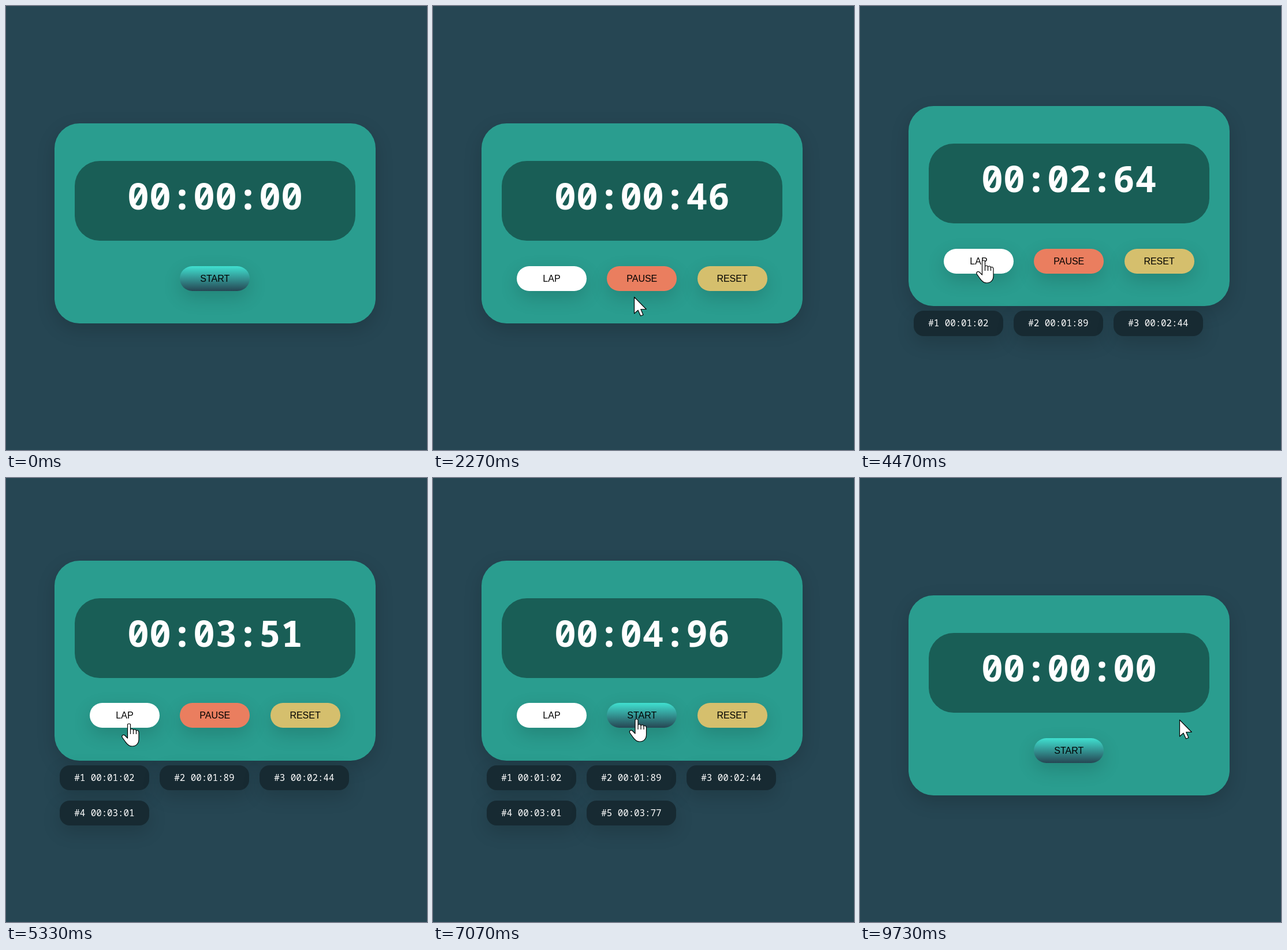
Animation, 729 px wide and 768 px high, one loop 9860 ms. Source, as an HTML page:

```html
<!DOCTYPE html>
<html lang="en">
<head>
<meta charset="utf-8">
<title>Stopwatch</title>
<style>
  html { font-size: 17.28px; }
  html, body { margin: 0; width: 100%; height: 100%; overflow: hidden; background: #264653; }
  div { position: absolute; box-sizing: border-box; text-align: center; white-space: pre; }
  #card, .button, .lap { box-shadow: 0 11px 32px rgba(0, 0, 0, .16); }
  #card { left: 84px; width: 556px; height: 20rem; border-radius: 2.5rem; background: #2a9d8f; }
  #display {
    left: 2rem; right: 2rem; top: 3.75rem; height: 8rem; border-radius: 2.5rem;
    background: rgba(0, 0, 0, .4); color: #fff;
    font: bold 63.36px/120px "Noto Sans Mono", monospace;
  }
  .button {
    top: 246.4px; width: 7rem; height: 2.5rem; border-radius: 1.25rem;
    font: 16px/2.5rem "Liberation Sans", Arial, sans-serif; color: #000;
  }
  .lap {
    width: 9rem; height: 2.5rem; border-radius: 1rem; background: #172a32; color: #fff;
    font: 500 15.84px/2.5rem "Noto Sans Mono", monospace;
  }
  svg { position: absolute; left: 0; top: 0; overflow: visible; }
  path { fill: #fff; stroke: #000; stroke-width: 1.2; stroke-linejoin: round; }
</style>
</head>
<body>
<div id="card">
  <div id="display"></div>
</div>
<svg id="cursor" width="1" height="1">
  <path id="arrow" d="M0 0V28.5L6.5 22.7L11 32.5L15.5 30.7L11.3 21H20.8Z"/>
  <path id="hand" d="M-2 25V2Q-2 0 .5 0T3 2V11Q3 9 5.5 9T8 12Q8 10 10.5 10T13 13Q13 11.5 15 11.5T17.5 15V27C17.5 34 13 39 6 39C-1 39-4 34-6 31L-11 24C-13 21-10 18-7 20ZM3 11V18M8 12V18M13 13V18"/>
</svg>
<script>
const LOOP = 9860, FRAME = 1000 / 15;
const START = 1840, PAUSE = 6790, RESET = 9450;

// Lap values in hundredths; the last lap is taken while paused.
const LAPS = [102, 189, 244, 301, 377, 496];
const lapTimes = LAPS.map(value => START + 10 * value);
lapTimes[5] = 7530;

// [time, hundredths]: the timer runs slightly unevenly
const CLOCK = [[1810, 0], [2267, 46], [3333, 150], [5333, 351], [6800, 496]];

// Cursor stops: [time, x, y]
const PATH = [
  [733, 731, 554], [1270, 238, 510], [1530, 345, 487], [2267, 348.5, 503.5],
  [2850, 203, 460], [3333, 201.5, 439], [4467, 213.5, 440], [4850, 212.5, 425],
  [5650, 212.5, 425], [6650, 352, 409], [7066, 352, 417], [7500, 207, 412],
  [8000, 569, 446], [8200, 530, 425], [8467, 553.5, 418.5]
];

const $ = id => document.getElementById(id);
const card = $("card");
const linear = u => u;
const smooth = u => u * u * (3 - 2 * u);

function add(className, text, left) {
  const el = document.createElement("div");
  el.className = className;
  el.textContent = text;
  el.style.left = left + "px";
  card.append(el);
  return el;
}

function format(hundredths) {
  const pad = n => String(n).padStart(2, "0");
  return `00:${pad(Math.floor(hundredths / 100))}:${pad(hundredths % 100)}`;
}

function sample(keys, t, ease) {
  const next = keys.findIndex(key => key[0] > t);
  if (next < 0) return keys[keys.length - 1].slice(1);
  if (next === 0) return keys[0].slice(1);
  const a = keys[next - 1], b = keys[next];
  const u = ease((t - a[0]) / (b[0] - a[0]));
  return a.slice(1).map((v, i) => v + (b[i + 1] - v) * u);
}

const buttons = ["LAP", "START", "RESET"].map((text, i) => add("button", text, 61 + 156.3 * i));
const [lapButton, mainButton, resetButton] = buttons;
lapButton.style.background = "#fff";
resetButton.style.background = "#d5bf6d";

const lapCards = LAPS.map((value, i) => {
  const el = add("lap", `#${i + 1} ${format(value)}`, 8.64 + 173 * (i % 3));
  el.style.top = 354.3 + 60.5 * Math.floor(i / 3) + "px";
  return el;
});

const clicks = [lapTimes, [START, PAUSE], [RESET]];

function draw(t) {
  const started = t >= START && t < RESET;
  const running = started && t < PAUSE;
  const count = started ? lapTimes.filter(time => time <= t).length : 0;

  card.style.top = 203.4 - 30.24 * Math.ceil(count / 3) + "px";
  const hundredths = started ? Math.round(sample(CLOCK, t, linear)[0]) : 0;
  $("display").textContent = format(hundredths);
  lapCards.forEach((el, i) => el.hidden = i >= count);

  lapButton.hidden = resetButton.hidden = !started;
  mainButton.textContent = running ? "PAUSE" : "START";
  mainButton.style.background = running ? "#ea7e5f" : "linear-gradient(#40e0d0, #264653)";
  buttons.forEach((el, i) => {
    const pressed = clicks[i].some(time => t < time && t > time - 100);
    el.style.filter = pressed ? "brightness(.88)" : "none";
  });

  const [x, y] = sample(PATH, t, smooth);
  const over = buttons.some(el => {
    const box = el.getBoundingClientRect();
    return x > box.left && x < box.right && y > box.top && y < box.bottom;
  });
  $("cursor").style.transform = `translate(${x}px, ${y}px)`;
  $("hand").style.display = over ? "" : "none";
  $("arrow").style.display = over ? "none" : "";
}

function tick() {
  const t = performance.now() % LOOP;
  draw(Math.floor((t + 4) / FRAME) * FRAME);
  requestAnimationFrame(tick);
}
tick();
</script>
</body>
</html>
```
